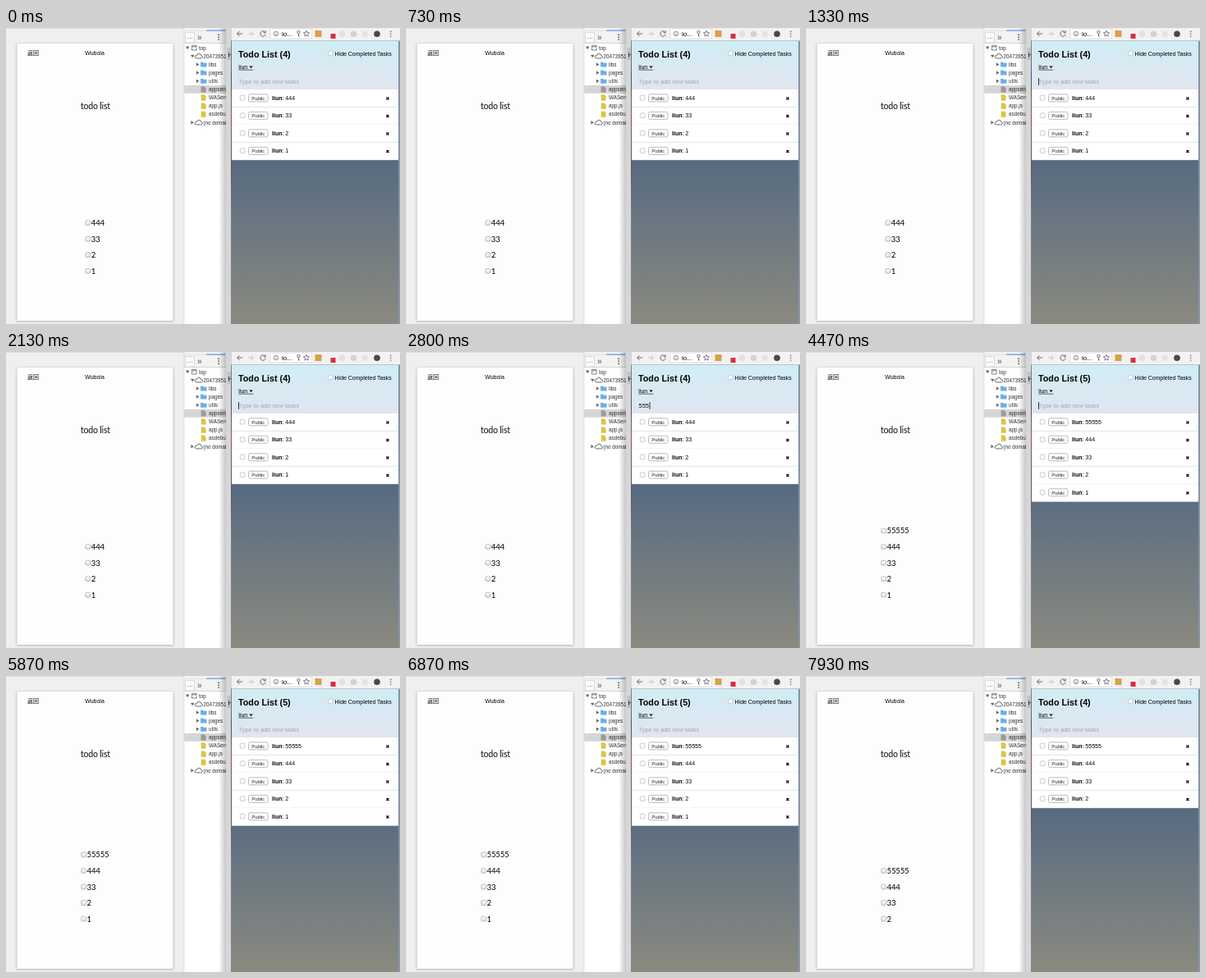
Animation of 480x361 px, one loop 8 s. Source, as an HTML page:

```html
<!DOCTYPE html>
<html lang="en">
<head>
<meta charset="utf-8">
<title>Todo list sync</title>
<style>
  html, body { margin: 0; width: 100%; height: 100%; overflow: hidden; background: #fff; }
  svg { display: block; width: 100%; height: 100%; }
  text { font-family: "Liberation Sans", Arial, sans-serif; font-size: 7px; white-space: pre; }
  .bold { font-weight: bold; }
  .phone { font-family: Lato, sans-serif; font-size: 9.6px; letter-spacing: -.22px; }
  .tree { font-size: 6.3px; fill: #303030; }
  .cjk { font-family: "Noto Sans CJK SC", "Noto Sans CJK", sans-serif; }
</style>
</head>
<body>
<svg id="stage" viewBox="0 0 480 361" preserveAspectRatio="none">
  <defs>
    <linearGradient id="page" gradientUnits="userSpaceOnUse" x1="0" y1="16" x2="0" y2="370">
      <stop stop-color="#315481"/><stop offset="1" stop-color="#8d8b80"/>
    </linearGradient>
    <linearGradient id="head" x2="0" y2="1">
      <stop stop-color="#d0edf5"/><stop offset="1" stop-color="#e1e5f0"/>
    </linearGradient>
    <linearGradient id="shade">
      <stop stop-opacity="0"/><stop offset="1" stop-opacity=".22"/>
    </linearGradient>
    <linearGradient id="edge" x2="0" y2="1">
      <stop stop-color="#7e8a98"/><stop offset=".15" stop-color="#3d5674"/>
      <stop offset=".22" stop-color="#8a5a5c"/><stop offset=".45" stop-color="#6a4f5a"/>
      <stop offset=".6" stop-color="#6f7d8c"/><stop offset="1" stop-color="#868983"/>
    </linearGradient>
    <linearGradient id="box" x2="0" y2="1">
      <stop stop-color="#fff"/><stop offset="1" stop-color="#e2e2e2"/>
    </linearGradient>
    <filter id="soft" x="-5%" y="-5%" width="110%" height="110%"><feGaussianBlur stdDeviation="1.5"/></filter>
    <clipPath id="treeClip"><rect x="217" width="51" height="361"/></clipPath>
  </defs>

  <!-- phone simulator -->
  <rect width="217" height="361" fill="#f0eff0"/>
  <rect width="217" height="1" fill="#dcdcdc"/>
  <rect x="13" y="19.5" width="191" height="338.5" fill="#000" opacity=".25" filter="url(#soft)"/>
  <rect x="13.5" y="19" width="190" height="338" fill="#fefdfe"/>
  <text class="cjk" lang="zh-CN" x="26" y="33">返回</text>
  <text x="108" y="33" text-anchor="middle">Wubola</text>
  <text class="phone" x="91" y="98.8" style="font-size:10.6px" fill="#111">todo list</text>
  <g id="phoneList"></g>

  <!-- developer tools -->
  <rect x="217" width="51" height="361" fill="#fff"/>
  <rect x="217" width="51" height="18" fill="#f3f3f3"/>
  <path d="M217 18.5H268" stroke="#ccc" stroke-width=".8"/>
  <path d="M216.8 0V361" stroke="#d4d4d4" stroke-width=".7"/>
  <path d="M217 3.3H268" stroke="#d0d0d0" stroke-width=".6"/>
  <path d="M244 3H267" stroke="#5b9df2" stroke-width="1.2"/>
  <rect x="218.5" y="5.5" width="11" height="12.5" fill="#fafafa" stroke="#c8c8c8" stroke-width=".6"/>
  <text x="220.5" y="13" fill="#444">…</text>
  <text x="233" y="14.5" fill="#555" style="font-size:10px">»</text>
  <g fill="#555"><circle cx="259" cy="8.2" r=".9"/><circle cx="259" cy="11.2" r=".9"/><circle cx="259" cy="14.2" r=".9"/></g>
  <g id="tree" clip-path="url(#treeClip)"></g>
  <rect x="259" width="9" height="361" fill="url(#shade)"/>

  <!-- strip between the windows -->
  <rect x="268" width="7.5" height="361" fill="#d6d6d8"/>
  <rect x="269.5" y="25" width="6" height="13" fill="#c4c4c6"/>
  <path d="M269.5 25H275M269.5 38H275" stroke="#aaa" stroke-width=".7"/>
  <path d="M271.5 29.8V35.6M271.5 32.7H274" fill="none" stroke="#333" stroke-width=".9"/>
  <rect x="274" y="15" width="1.2" height="346" fill="url(#edge)"/>

  <!-- browser -->
  <rect x="275" y="15" width="205" height="346" fill="url(#page)"/>
  <rect x="275" width="205" height="15.7" fill="#f2f2f2"/>
  <path d="M275 15.6H480" stroke="#c4c4c4" stroke-width=".7"/>
  <g fill="none" stroke-width="1">
    <path d="M288 7H281.5M284.5 4L281.5 7L284.5 10" stroke="#666"/>
    <path d="M295 7H301.5M298.5 4L301.5 7L298.5 10" stroke="#c4c4c4"/>
    <path d="M315.5 5A3.2 3.2 0 1 0 316.2 7.6M316.2 3.4V5.8H313.8" stroke="#666"/>
  </g>
  <rect x="322" y="1" width="50.5" height="12" rx="1.5" fill="#fff" stroke="#cfcfcf" stroke-width=".6"/>
  <circle cx="329" cy="7" r="2.8" fill="none" stroke="#666" stroke-width=".7"/>
  <path d="M329 5.2V5.9M329 6.6V8.8" stroke="#666" stroke-width=".8"/>
  <text x="336" y="9.8" style="font-size:8px">lo...</text>
  <circle cx="356.5" cy="5" r="1.7" fill="none" stroke="#666" stroke-width=".9"/>
  <path d="M356.5 6.7V10.6M356.5 9.4H358" stroke="#666" stroke-width=".9"/>
  <path id="star" fill="none" stroke="#5d5d5d" stroke-width=".8"/>
  <g id="badges"></g>
  <g fill="#666"><circle cx="468.7" cy="4.4" r=".8"/><circle cx="468.7" cy="7.2" r=".8"/><circle cx="468.7" cy="10" r=".8"/></g>

  <rect x="275" y="16" width="203.2" height="59" fill="url(#head)"/>
  <text id="title" class="bold" x="283" y="36.3" style="font-size:10.75px"></text>
  <text x="400.6" y="33.5" style="font-size:6.93px">Hide Completed Tasks</text>
  <text x="283.3" y="49.6">liun</text>
  <path d="M296.3 46.4H300.7L298.5 49Z"/>
  <path d="M283.3 51.1H301" stroke="#000" stroke-width=".6"/>
  <text id="field" x="283.6" y="68.2" style="font-size:7.4px"></text>
  <rect id="caret" y="61.2" width=".8" height="8.6"/>
  <g id="taskList"></g>
  <rect x="478.2" y="15.7" width="1.8" height="346" fill="#8797a8"/>
</svg>
<script>
const LOOP = 8000;
const FOCUS = 1000, SUBMIT = 4000, PHONE_ADD = 4150, REMOVE = 7400, PHONE_REMOVE = 7500;
const KEYS = [2250, 2480, 2720, 3010, 3240];
const ROW = 21.5;
const $ = id => document.getElementById(id);

const check = (x, y, s, fill = '#fff', line = '#b4b4b4') =>
  `<rect x="${x}" y="${y}" width="${s}" height="${s}" rx="1" fill="${fill}" stroke="${line}" stroke-width=".7"/>`;

function tasksAt(t, add, remove) {
  const list = ['444', '33', '2', '1'];
  if (t >= add) list.unshift('55555');
  if (t >= remove) list.pop();
  return list;
}

function phoneRows(list) {
  const x = list[0].length > 3 ? 91.8 : 97;
  return list.map((name, i) => {
    const y = 296 - (list.length - 1 - i) * 19.55;
    return check(x, y - 2.6, 5.6, 'url(#box)', '#a4a4a4') +
      `<text class="phone" x="${x + 6.8}" y="${y + 3.6}">${name}</text>`;
  }).join('');
}

function taskRows(list) {
  return list.map((name, i) => `<g transform="translate(0 ${75 + i * ROW})">
    <rect x="275" width="203.2" height="${ROW}" fill="#fff"/>
    <path d="M275 ${ROW - .3}H478.2" stroke="#ececec" stroke-width=".7"/>
    ${check(285.3, 7.4, 5.6)}
    <rect x="295.5" y="5.8" width="23.5" height="9" rx="1.8" fill="#fff" stroke="#aaa" stroke-width=".8"/>
    <text x="307.3" y="12.5" text-anchor="middle" style="font-size:5.9px" fill="#222">Public</text>
    <text x="324" y="12.5"><tspan class="bold">liun</tspan>: ${name}</text>
    <path d="M463.4 9.3L466.4 12.5M466.4 9.3L463.4 12.5" stroke="#000" stroke-width="1.2"/></g>`).join('');
}

function drawTree() {
  const rows = ['top', '20473951', 'libs', 'pages', 'utils', 'appserv', 'WAServ', 'app.js', 'asdebu', '(no domai'];
  const cloud = 'h6a1.7 1.7 0 0 0 .2-3.4a2.7 2.7 0 0 0-5.2-.4a1.9 1.9 0 0 0-1 3.8z';
  $('tree').innerHTML = rows.map((name, i) => {
    const y = 24.2 + i * 10.12, root = i < 2 || i === 9, folder = i > 1 && i < 5;
    let s = i === 5 ? `<rect x="217" y="${y - 5}" width="51" height="10" fill="#d6d6d6"/>` : '';
    const ax = root ? (i ? 225 : 219) : 231.5;
    if (i < 2) s += `<path d="M${ax} ${y - 1.6}h4.4l-2.2 3.6z" fill="#666"/>`;
    else if (folder || root) s += `<path d="M${ax + .4} ${y - 2.3}l3.4 2.3l-3.4 2.3z" fill="#666"/>`;
    if (!i) s += `<path d="M226.5 ${y - 2.8}h5.5v5.6h-5.5zM226.5 ${y - 1.4}h5.5" fill="none" stroke="#555" stroke-width=".7"/>`;
    else if (root) s += `<path d="M231.6 ${y + 2.6}${cloud}" fill="none" stroke="#444" stroke-width=".8"/>`;
    else if (folder) s += `<path d="M237 ${y - 3}h3l.8 1h3.7v5h-7.5z" fill="#6caee6"/>`;
    else s += `<path d="M237.6 ${y - 3.6}h4l2 2v5.2h-6z" fill="${i === 5 ? '#999' : '#dcc545'}"/>`;
    return s + `<text class="tree" x="${i ? (root ? 240.5 : 247) : 235}" y="${y + 2.3}">${name}</text>`;
  }).join('');
}

function drawBrowserBits() {
  const pts = [...Array(10)].map((_, i) => {
    const a = i * Math.PI / 5, r = i % 2 ? 1.7 : 3.8;
    return `${366 + r * Math.sin(a)} ${7 - r * Math.cos(a)}`;
  });
  $('star').setAttribute('d', `M${pts.join('L')}Z`);
  const square = (x, y, s, c) => `<rect x="${x}" y="${y}" width="${s}" height="${s}" fill="${c}"/>`;
  const dot = (x, c) => `<circle cx="${x}" cy="7.2" r="3.8" fill="${c}"/>`;
  $('badges').innerHTML = square(376.5, 3, 8, '#d9a04a') + square(395.5, 7, 6, '#dc2f3c') +
    dot(409.5, '#e2e2e2') + dot(423.5, '#d2d2d2') + dot(437.5, '#e4e4e4') + dot(452, '#4c4744');
  $('title').insertAdjacentHTML('afterend', check(392.5, 28.1, 5.6));
}

let last = '';
function render(t) {
  const tasks = tasksAt(t, SUBMIT, REMOVE);
  const phone = tasksAt(t, PHONE_ADD, PHONE_REMOVE);
  const typed = t < SUBMIT ? KEYS.filter(k => k <= t).length : 0;
  const since = [FOCUS, ...KEYS, SUBMIT].filter(k => k <= t).pop();
  const caret = t >= FOCUS && t < REMOVE && (t - since) % 1000 < 500;
  const state = [tasks, phone, typed, caret].join('|');
  if (state === last) return;
  last = state;
  $('title').textContent = `Todo List (${tasks.length})`;
  $('field').textContent = typed ? '5'.repeat(typed) : 'Type to add new tasks';
  $('field').setAttribute('fill', typed ? '#111' : '#a4a9b1');
  $('caret').setAttribute('x', 283.2 + typed * 4.3 + (typed ? .5 : 0));
  $('caret').setAttribute('opacity', caret ? 1 : 0);
  $('taskList').innerHTML = taskRows(tasks);
  $('phoneList').innerHTML = phoneRows(phone);
}

drawTree();
drawBrowserBits();
render(0);
const start = performance.now();
function tick() {
  render((performance.now() - start) % LOOP);
  requestAnimationFrame(tick);
}
requestAnimationFrame(tick);
</script>
</body>
</html>
```
